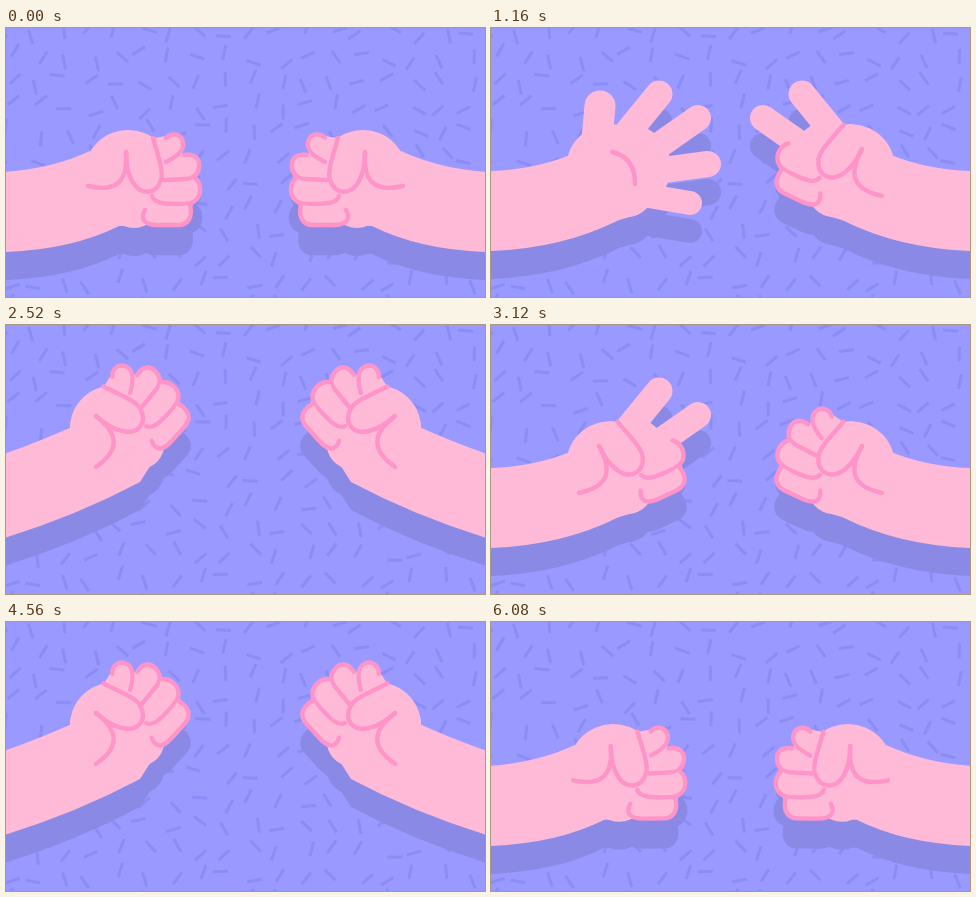
Recreate the animation shown at these times as an HTML page with a canvas. Size 479 by 269 pixels, loop 6.12 s.

```html
<!DOCTYPE html>
<html lang="en">
<head>
<meta charset="utf-8">
<title>Rock paper scissors</title>
<style>
  html, body { margin: 0; width: 100%; height: 100%; overflow: hidden; background: #9999ff; }
  canvas { display: block; }
</style>
</head>
<body>
<canvas id="stage" width="479" height="269"></canvas>
<script>
const W = 479, H = 269, ROUND = 2040, STEP = 40;
const ctx = document.getElementById('stage').getContext('2d');
const SKIN = '#ffbad8', LINE = '#ff94c8', SHADOW = '#8a8ae6';
const SHADOW_DROP = 28;

// hand x, y, angle | arm: top edge y, control, wrist top, wrist bottom, control, bottom edge y
const REST  = [120, 124,   0, 144, 45, 141, 84, 123, 113, 198, 65, 222, 224];
const UP    = [ 90,  91, -48, 129, 35, 116, 70, 100, 134, 157, 70, 191, 213];
const FINAL = [108, 121, -25, 143, 42, 142, 79, 127, 128, 192, 70, 221, 223];

// Each round: [left, right]
const ROUNDS = [['paper', 'scissors'], ['scissors', 'rock'], ['rock', 'paper']];

// Folded hand, drawn in the REST pose
const KNUCKLES = new Path2D('M148 110L160 108L176 124L189 150L187 176L180 196L140 197L120 150Z');
const INDEX = new Path2D('M160 110C164 105 173 105 176 111C180 119 176 126 160 134');
const MIDDLE = new Path2D('M178 127C190 125 194 132 193 139C192 147 187 151 179 151L158 152');
const RING = new Path2D('M189 150C196 156 195 166 191 171C187 176 180 176 172 176C158 176 148 175 146 168');
const PINKY = new Path2D('M184 177C187 189 182 197 172 197L152 197C138 197 134 191 139 182');
const THUMB = new Path2D('M147 110C152 128 158 144 155 152C150 167 134 168 126 153Q120 142 120 124');
const CREASE = new Path2D('M120 124C122 152 112 165 82 158');

// Straight fingers in the FINAL pose: base x, y, tip x, y, width
const LONG = [[128, 115, 168, 66, 27], [150, 130, 207, 90, 26]];
const SPREAD = [...LONG, [105, 122, 109, 78, 31], [158, 144, 217, 136, 26], [140, 165, 199, 175, 24]];
const PALM_LINE = new Path2D('M121 124Q144 129 144 156');

const clamp = u => Math.min(1, Math.max(0, u));
const ease = u => u * u * (3 - 2 * u);
const mix = (a, b, k) => a.map((v, i) => v + (b[i] - v) * k);
const radians = degrees => degrees * Math.PI / 180;

function poseAt(t) {
  const bounce = 1.3;
  if (t < 500) return mix(REST, UP, ease(clamp(t / 480)));
  if (t < 720) return mix(UP, mix(FINAL, REST, bounce), ((t - 500) / 220) ** 2);
  if (t < 1600) return mix(FINAL, REST, bounce * (1 - clamp((t - 720) / 380)) ** 3);
  return mix(FINAL, REST, ease((t - 1600) / 440));
}

const openAt = t => t < 1200 ? clamp((t - 590) / 110) : 1 - ease(clamp((t - 1600) / 260));

function disc(x, y, r) {
  ctx.beginPath();
  ctx.arc(x, y, r, 0, 7);
  ctx.fill();
}

function outlined(path) {
  ctx.fill(path);
  ctx.stroke(path);
}

function inHand(pose, home, draw) {
  ctx.save();
  ctx.translate(pose[0], pose[1]);
  ctx.rotate(radians(pose[2] - home[2]));
  ctx.translate(-home[0], -home[1]);
  draw();
  ctx.restore();
}

// Forearm, running on into the heel of the hand
function arm([x, y, angle, top, ax, ay, wx, wy, vx, vy, bx, by, bottom]) {
  const cos = Math.cos(radians(angle)), sin = Math.sin(radians(angle));
  const heelX = x + 8 * cos - 50 * sin, heelY = y + 8 * sin + 50 * cos;
  ctx.beginPath();
  ctx.moveTo(-2, top);
  ctx.quadraticCurveTo(ax, ay, wx, wy);
  ctx.lineTo(heelX, heelY);
  ctx.lineTo(heelX + 11, heelY + 23.5);
  ctx.lineTo(vx, vy);
  ctx.quadraticCurveTo(bx, by, -2, bottom);
  ctx.fill();
}

function straight(fingers, open, skin) {
  ctx.save();
  ctx.strokeStyle = skin;
  for (const [x, y, tipX, tipY, width] of fingers) {
    const k = .35 + .65 * open;
    ctx.lineWidth = width;
    ctx.beginPath();
    ctx.moveTo(x, y);
    ctx.lineTo(x + (tipX - x) * k, y + (tipY - y) * k);
    ctx.stroke();
  }
  ctx.restore();
}

function hand(pose, sign, open, skin, line) {
  if (open < .15) sign = 'rock';
  ctx.fillStyle = skin;
  ctx.strokeStyle = line;
  ctx.lineWidth = 4.4;
  arm(pose);
  inHand(pose, REST, () => {
    disc(122, 146, 44);
    disc(128, 174, 26);
  });
  if (sign !== 'rock') {
    inHand(pose, FINAL, () => straight(sign === 'paper' ? SPREAD : LONG, open, skin));
  }
  if (sign === 'paper') {
    inHand(pose, FINAL, () => {
      disc(137, 139, 43);
      ctx.stroke(PALM_LINE);
    });
    return;
  }
  inHand(pose, REST, () => {
    ctx.fill(KNUCKLES);
    if (sign === 'rock') [INDEX, MIDDLE].forEach(outlined);
    [RING, PINKY, THUMB].forEach(outlined);
    ctx.stroke(CREASE);
  });
}

function bothHands(t, signs, skin, line) {
  const pose = poseAt(t), open = openAt(t);
  signs.forEach((sign, mirrored) => {
    ctx.save();
    if (mirrored) {
      ctx.translate(W, 0);
      ctx.scale(-1, 1);
    }
    hand(pose, sign, open, skin, line);
    ctx.restore();
  });
}

// Scattered dashes on a jittered grid
let seed = 11;
const random = () => (seed = seed * 16807 % 2147483647) / 2147483647;
const dashes = new Path2D();
for (let y = 4; y < H + 12; y += 25) {
  for (let x = 4; x < W + 12; x += 27) {
    const cx = x + random() * 14 - 7, cy = y + random() * 14 - 7;
    const a = random() * Math.PI, dx = Math.cos(a) * 7.5, dy = Math.sin(a) * 7.5;
    dashes.moveTo(cx - dx, cy - dy);
    dashes.lineTo(cx + dx, cy + dy);
  }
}

function background() {
  ctx.fillStyle = '#9999ff';
  ctx.fillRect(0, 0, W, H);
  ctx.strokeStyle = '#8c8cf7';
  ctx.lineWidth = 3;
  ctx.lineCap = 'butt';
  ctx.stroke(dashes);
}

function frame(now) {
  const time = Math.floor(now / STEP) * STEP % (ROUND * ROUNDS.length);
  const t = time % ROUND, signs = ROUNDS[Math.floor(time / ROUND)];
  background();
  ctx.lineCap = ctx.lineJoin = 'round';
  ctx.save();
  ctx.translate(0, SHADOW_DROP);
  bothHands(t, signs, SHADOW, SHADOW);
  ctx.restore();
  bothHands(t, signs, SKIN, LINE);
}

let start;
function tick(now) {
  start ??= now;
  frame(now - start);
  requestAnimationFrame(tick);
}
frame(0);
requestAnimationFrame(tick);
</script>
</body>
</html>
```
